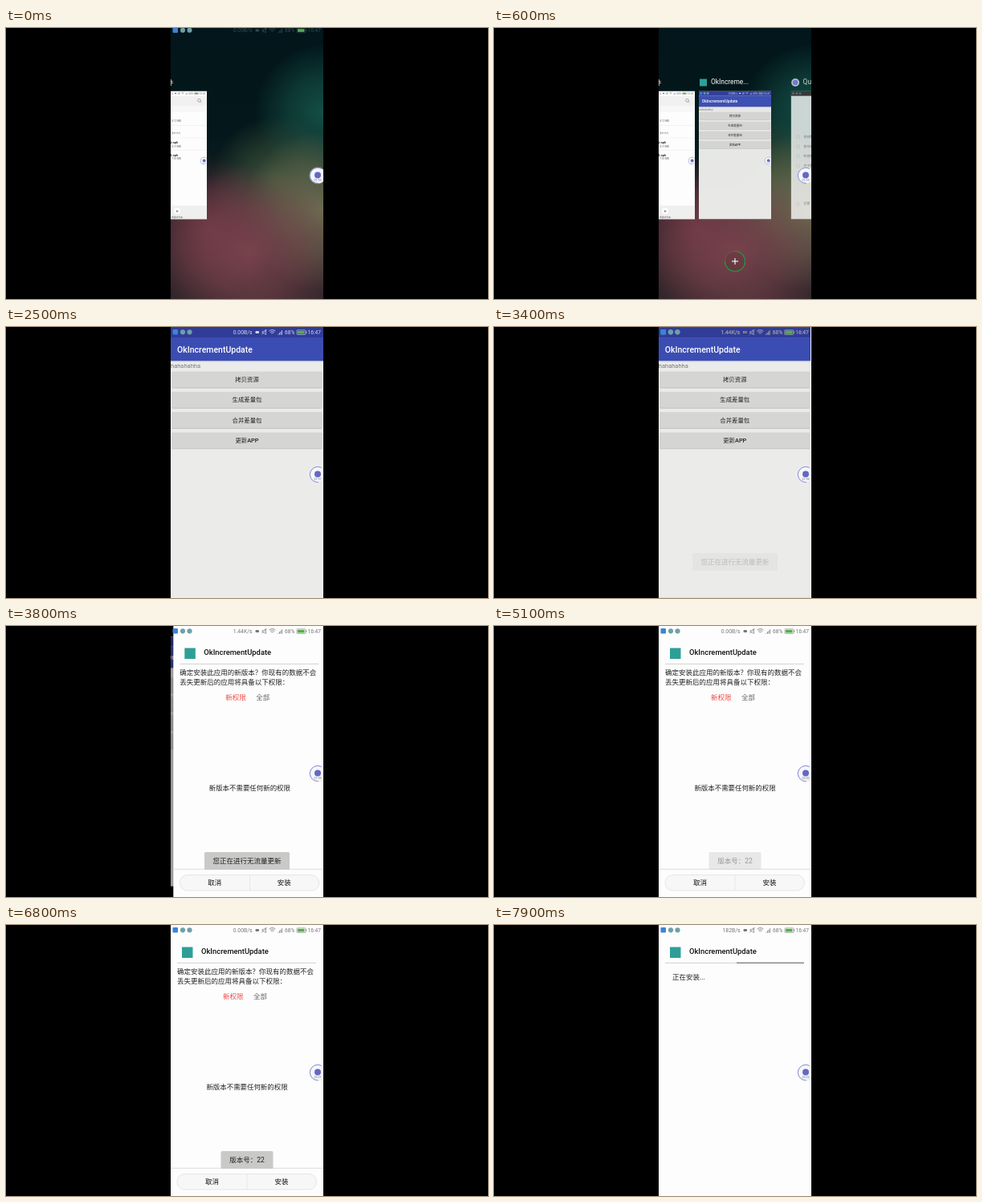
Write an HTML page with a canvas that moves like this. It is 600 px wide and 338 px high and loops after 8000 ms.

```html
<!DOCTYPE html>
<html lang="zh-CN">
<head>
<meta charset="utf-8">
<style>
html, body { margin: 0; width: 100%; height: 100%; overflow: hidden; background: #000; }
canvas { display: block; }
</style>
</head>
<body>
<canvas id="stage" width="600" height="338"></canvas>
<script>
const c = document.getElementById('stage').getContext('2d');
const LOOP = 8000, W = 190, H = 338, LEFT = 205, CARD = 90 / W, CARD_Y = 78.5;
const FONT = "Roboto, 'Noto Sans CJK SC', 'Noto Sans CJK', 'Noto Sans', sans-serif";
const TEAL = '#2e9f97', VIOLET = '#6269c4';

const ramp = (t, a, b) => Math.min(1, Math.max(0, (t - a) / (b - a)));
const easeOut = (p, n = 3) => 1 - (1 - p) ** n;
const mix = (a, b, p) => a + (b - a) * p;

function rect(x, y, w, h, fill) {
  c.fillStyle = fill;
  c.fillRect(x, y, w, h);
}

function round(x, y, w, h, r, fill, stroke) {
  c.beginPath();
  c.roundRect(x, y, w, h, r);
  if (fill) { c.fillStyle = fill; c.fill(); }
  if (stroke) { c.strokeStyle = stroke; c.lineWidth = .6; c.stroke(); }
}

function circle(x, y, r, fill, stroke, width = 1, from = 0, to = Math.PI * 2) {
  c.beginPath();
  c.arc(x, y, r, from, to);
  if (fill) { c.fillStyle = fill; c.fill(); }
  if (stroke) { c.strokeStyle = stroke; c.lineWidth = width; c.stroke(); }
}

function path(points, stroke, width = .8) {
  c.beginPath();
  points.forEach(([x, y]) => c.lineTo(x, y));
  c.strokeStyle = stroke;
  c.lineWidth = width;
  c.stroke();
}

function text(s, x, y, size, fill, align = 'left', weight = 400) {
  c.font = `${weight} ${size}px ${FONT}`;
  c.textAlign = align;
  c.textBaseline = 'middle';
  c.fillStyle = fill;
  c.fillText(s, x, y);
}

// Draws in a moved, scaled and faded coordinate system.
function layer(x, y, scale, alpha, draw) {
  if (alpha <= 0) return;
  c.save();
  c.translate(x, y);
  c.scale(scale, scale);
  c.globalAlpha *= alpha;
  draw();
  c.restore();
}

function clip(x, y, w, h) {
  c.beginPath();
  c.rect(x, y, w, h);
  c.clip();
}

function speed(t) {
  if (t >= 3400 && t < 4300) return '1.44K/s';
  return t >= 7000 ? '182B/s' : '0.00B/s';
}

function statusBar(t, color) {
  round(2.5, 3, 6.5, 6.5, 1, '#3d83d6');
  circle(15, 6.3, 3.1, '#6f9fa8');
  circle(23.5, 6.3, 3.1, '#6f9fa8');
  text(speed(t), 101.5, 7, 6.8, color, 'right');
  round(105.5, 5, 4.5, 3, 1, color);
  path([[114, 5.5], [115.5, 5.5], [118.5, 3.5], [118.5, 9.5], [115.5, 7.5], [114, 7.5], [114, 5.5]], color, .7);
  path([[113.5, 9.5], [119.5, 3.5]], color, .6);
  for (const r of [2, 4, 6]) circle(126.5, 9.5, r, null, color, .8, -2.3, -.84);
  for (let i = 0; i < 4; i++) rect(133.5 + i * 1.5, 8.7 - i * 1.5, .8, 1 + i * 1.5, color);
  text('68%', 142, 7, 6.6, color);
  round(157, 3.8, 11, 5.6, 1, null, color);
  rect(158, 4.8, 8.5, 3.6, '#55ad4d');
  rect(168.3, 5.6, 1, 2, color);
  text('16:47', 187, 7, 6.6, color, 'right');
}

function recorder(t) {
  circle(183, 184, 10, '#f6f6fa', '#d6d8ea', .6);
  circle(183, 184, 9.6, null, '#858cdb', 1, 1.5, 5.2);
  circle(183, 183.5, 4, VIOLET);
  const s = 115 + Math.floor(t / 1000);
  text(`0${Math.floor(s / 60)}:${String(s % 60).padStart(2, '0')}`, 183, 190.3, 3.6, '#777', 'center');
}

function appScreen(t) {
  rect(0, 0, W, H, '#ebecea');
  rect(0, 0, W, 13, '#303c98');
  rect(0, 13, W, 29, '#3b4db3');
  rect(0, 42, W, 1.2, '#b9bcc6');
  statusBar(t, '#d5d8ec');
  text('OkIncrementUpdate', 8, 28.5, 10.5, '#fff', 'left', 500);
  text('hahahahha', 0, 48.5, 7.5, '#777');
  ['拷贝资源', '生成差量包', '合并差量包', '更新APP'].forEach((label, i) => {
    const y = 55.5 + i * 25.3;
    round(1.5, y + .6, 187, 20.3, 1, '#bfc0bf');
    round(1.5, y, 187, 20, 1, '#d5d6d4');
    text(label, 95, y + 10.4, 7.4, '#222', 'center', 500);
  });
}

function filesScreen(t) {
  rect(0, 0, W, H, '#fcfdfc');
  rect(0, 13, W, 27, '#f0f1f0');
  rect(0, 40, W, 15, '#f6f7f6');
  statusBar(t, '#777');
  circle(170, 25, 4, null, '#555');
  path([[173, 28], [176, 31]], '#555', 1);
  for (const y of [90, 123, 155]) rect(0, y, W, 1, '#e6e6e6');
  text('8.12 MB', 97, 80, 6.8, '#666');
  text('备份文件', 97, 112, 6, '#777');
  text('new.apk', 114, 136, 8.5, '#111', 'right', 500);
  text('4.15 MB', 97, 146, 6.8, '#666');
  text('old.apk', 114, 169, 8.5, '#111', 'right', 500);
  text('7.56 MB', 97, 179, 6.8, '#666');
  rect(0, 302, W, 36, '#eeefee');
  circle(112, 316, 10, '#fff', '#e0e0e0');
  text('+', 112, 316, 13, '#333', 'center');
  text('新建文件夹', 112, 332, 6, '#555', 'center');
}

function profileScreen() {
  rect(0, 0, W, H, '#fbfcfb');
  rect(0, 0, W, 13, '#111');
  for (const x of [6, 15, 24]) circle(x, 6.5, 3, '#5a7f8c');
  circle(80, 66, 20, '#dedfde');
  text('user_2741', 95, 97, 8, '#666', 'center');
  const row = (label, y) => {
    round(14, y - 4, 8, 8, 2, null, '#999');
    text(label, 33, y, 8.3, '#666');
  };
  ['视频剪辑器', '意见反馈', '检查更新', '关于我们'].forEach((s, i) => row(s, 121 + i * 25.3));
  row('设置', 297);
  circle(89, 297, 5, null, '#aaa');
}

function wallpaper(t) {
  const base = c.createLinearGradient(0, 0, 0, H);
  base.addColorStop(0, '#02161b');
  base.addColorStop(.4, '#04181b');
  base.addColorStop(1, '#33272b');
  rect(0, 0, W, H, base);
  const glow = (x, y, r, rgb, a) => {
    const g = c.createRadialGradient(x, y, 0, x, y, r);
    g.addColorStop(0, `rgba(${rgb},${a})`);
    g.addColorStop(.5, `rgba(${rgb},${a * .6})`);
    g.addColorStop(1, `rgba(${rgb},0)`);
    rect(0, 0, W, H, g);
  };
  glow(190, 105, 85, '24,92,80', .8);
  glow(130, 190, 80, '72,98,66', .7);
  glow(190, 228, 100, '128,126,92', .8);
  glow(45, 250, 90, '122,58,72', .75);
  glow(100, 280, 110, '130,70,80', .85);
  rect(0, 0, W, H, `rgba(0,0,0,${.15 * ramp(t, 700, 1100)})`);
}

function clearButton(t) {
  const p = easeOut(ramp(t, 350, 550));
  const turn = ramp(t, 700, 950) * Math.PI / 4;
  layer(95, 291, mix(.6, 1, p), p, () => {
    circle(0, 0, 12.5, 'rgba(0,0,0,.08)', 'rgba(120,130,120,.5)', .7);
    circle(0, 0, 12.5, null, '#1f9a38', 1.2, -Math.PI / 2, Math.PI);
    c.rotate(turn);
    path([[-4, 0], [4, 0]], '#fff', 1.1);
    path([[0, -4], [0, 4]], '#fff', 1.1);
  });
  layer(95, 318, 1, ramp(t, 850, 1050), () => text('全部清理', 0, 0, 8.5, '#aaa6a6', 'center'));
}

function card(x, alpha, t, screen) {
  layer(x, CARD_Y, CARD, alpha, () => {
    clip(0, 0, W, H);
    screen(t);
    recorder(t);
  });
}

function recents(t) {
  wallpaper(t);
  const leave = ramp(t, 0, 250);
  layer(0, -3.5 - 10 * leave, 1, 1 - leave, () => statusBar(t, 'rgba(190,205,210,.28)'));
  text('文件', 3.5, 68, 8.5, '#fff', 'right');
  card(-45, 1, t, filesScreen);

  card(50, ramp(t, 150, 610), t, appScreen);
  layer(0, 0, 1, ramp(t, 150, 450), () => {
    rect(51, 63.5, 9, 9, TEAL);
    text('OkIncreme...', 65, 68, 8.4, '#fff');
  });

  const x = mix(190, 144.7, easeOut(ramp(t, 360, 960), 1.6));
  const fade = ramp(t, 300, 680);
  card(x, fade, t, profileScreen);
  layer(x, 68, 1, fade, () => {
    circle(5.5, 0, 5, '#dfe1f5');
    circle(5.5, 0, 3.2, VIOLET);
    text('Quorvel', 15, 0, 8.4, '#fff');
  });
  clearButton(t);

  layer(114, 208, 1, ramp(t, 1280, 1340) * (1 - ramp(t, 1480, 1560)), () =>
    circle(0, 0, 5.8, 'rgba(250,250,252,.9)', '#a3a6c8', .8));
}

function installScreen(t) {
  const busy = t >= 7150;
  rect(0, 0, W, H, '#fcfdfc');
  rect(14, 27.5, 13.5, 13.5, TEAL);
  text('OkIncrementUpdate', 38, 33, 9.4, '#111', 'left', 500);
  rect(8, 46.8, 173, 1, '#cfcfcf');
  if (busy) {
    const from = 97 + (t - 7900) * .135;
    const a = Math.max(8, from), b = Math.min(181, from + 84);
    rect(a, 46.6, b - a, 1.4, '#858585');
    text('正在安装...', 17, 65, 8.5, '#222');
    return;
  }
  text('确定安装此应用的新版本？你现有的数据不会', 8, 58.5, 8.5, '#222');
  text('丢失更新后的应用将具备以下权限：', 8, 70.5, 8.5, '#222');
  text('新权限', 65, 89.5, 8.5, '#ee4a47');
  text('全部', 103, 89.5, 8.5, '#666');
  text('新版本不需要任何新的权限', 95, 203, 8.45, '#222', 'center');
  rect(0, 302.8, W, 1, '#dcdcdc');
  round(8, 310.5, 173.5, 19.5, 9.5, '#f6f7f6', '#d8d8d8');
  rect(94.7, 311, .6, 19, '#dcdcdc');
  text('取消', 51.5, 320.7, 8.5, '#111', 'center');
  text('安装', 138, 320.7, 8.5, '#111', 'center');
}

function toast(label, width, alpha) {
  layer(95, 293, 1, alpha, () => {
    round(-width / 2, -11, width, 22, 1.5, '#c9c9c8');
    text(label, 0, .3, 8.5, '#222', 'center');
  });
}

function render(t) {
  rect(0, 0, 600, H, '#000');
  c.save();
  c.translate(LEFT, 0);
  clip(0, 0, W, H);

  const open = easeOut(ramp(t, 1650, 2000), 2);
  if (open < 1) recents(t);
  const slide = easeOut(ramp(t, 3400, 3900), 2.5);
  if (open > 0 && slide < 1) {
    const s = mix(CARD, 1, open) * (1 - .08 * slide);
    layer(mix(50, 0, open) - 40 * slide, mix(CARD_Y, 0, open) + H * .04 * slide, s, 1, () => {
      clip(0, 0, W, H);
      appScreen(t);
      rect(0, 0, W, H, `rgba(0,0,0,${.35 * slide})`);
    });
  }
  if (slide > 0) {
    layer(W * (1 - slide), 0, 1, 1, () => installScreen(t));
    statusBar(t, '#777');
  }

  toast('您正在进行无流量更新', 106, ramp(t, 3350, 3600) * (1 - ramp(t, 4700, 4950)));
  toast('版本号：22', 65, ramp(t, 5000, 5250) * (1 - ramp(t, 7000, 7250)));
  recorder(t);
  c.restore();
}

function frame(now) {
  render(now % LOOP);
  requestAnimationFrame(frame);
}
requestAnimationFrame(frame);
</script>
</body>
</html>
```
